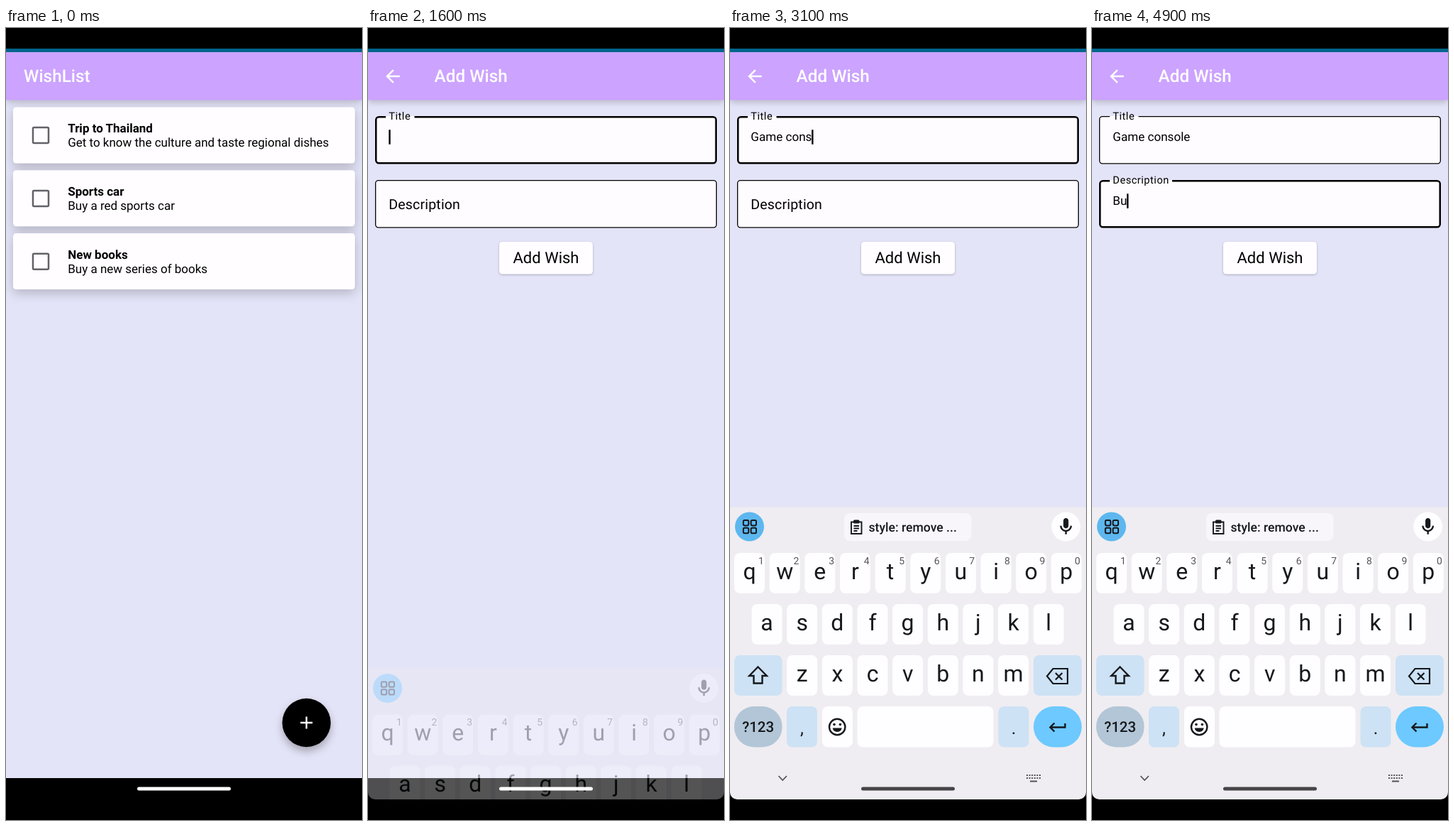
Recreate the animation shown at these times as an HTML page. Size 502 px wide and 1115 px high, loop 5 s.

```html
<!DOCTYPE html>
<html lang="en">
<head>
<meta charset="utf-8">
<title>WishList</title>
<style>
  html, body { margin: 0; height: 100%; overflow: hidden; background: #000; }
  svg { display: block; width: 502px; height: 1115px; }
  text { font-family: Roboto, sans-serif; white-space: pre; text-rendering: geometricPrecision; }
  .mid { text-anchor: middle; }
  .bar { filter: drop-shadow(0 3px 4px rgba(0, 0, 0, .2)); }
  .card { filter: drop-shadow(0 5px 8px rgba(0, 0, 0, .22)); }
  .fab { filter: drop-shadow(0 6px 6px rgba(0, 0, 0, .28)); }
  .button { filter: drop-shadow(0 1.5px 1.5px rgba(0, 0, 0, .25)); }
  .line { fill: none; stroke: #15181c; stroke-width: 2.4; }
</style>
</head>
<body>
<svg id="stage" viewBox="0 0 502 1115"></svg>
<script>
const LOOP = 5000, STEP = 100;
const INK = '#15181c', KEY = '#fefdff', SOFT = '#cde2f5', SKY = '#6dc9ff';

const rect = (x, y, w, h, fill, r = 0, extra = '') =>
  `<rect x="${x}" y="${y}" width="${w}" height="${h}" rx="${r}" fill="${fill}" ${extra}/>`;
const disc = (x, y, r, fill, extra = '') => `<circle cx="${x}" cy="${y}" r="${r}" fill="${fill}" ${extra}/>`;
const text = (x, y, size, str, extra = '') => `<text x="${x}" y="${y}" font-size="${size}" ${extra}>${str}</text>`;
const line = (d, extra = '') => `<path class="line" d="${d}" ${extra}/>`;
const icon = (x, y, scale, d, fill) =>
  `<path transform="translate(${x} ${y}) scale(${scale}) translate(-12 -12)" d="${d}" fill="${fill}"/>`;

const appBar = (x, title) =>
  rect(0, 34, 502, 1022, '#e4e4f8') +
  rect(0, 34, 502, 67.5, '#cca3ff', 0, 'class="bar"') +
  text(x, 76, 24.3, title, 'fill="#fff" font-weight="500"');

function listScreen() {
  const wishes = [
    ['Trip to Thailand', 'Get to know the culture and taste regional dishes'],
    ['Sports car', 'Buy a red sports car'],
    ['New books', 'Buy a new series of books'],
  ];
  const cards = wishes.map(([title, note], i) => {
    const y = 111.5 + i * 88.8;
    return rect(10, y, 482, 79, '#fffdff', 4.5, 'class="card"') +
      rect(38, y + 28.6, 22, 22, 'none', 1.5, 'stroke="#626268" stroke-width="2.5"') +
      text(87.2, y + 35.6, 17, title, 'font-weight="700"') +
      text(87.2, y + 55.4, 17, note);
  }).join('');
  return appBar(25, 'WishList') + cards +
    disc(423.7, 978, 34.2, '#000', 'class="fab"') +
    line('M415.2 978h17M423.7 969.5v17', 'style="stroke:#fff"');
}

const field = (id, label) => `<g id="${id}">
  <rect x="10" width="482" height="67.5" rx="5" fill="#fffcff"/>
  <path fill="none" stroke="#000"/><text class="label" x="29.3">${label}</text>
  <text class="value" x="29.3" font-size="17.08"></text>
  <rect class="caret" width="2.4" height="20.5"/></g>`;

const addScreen = () => appBar(93.5, 'Add Wish') +
  icon(35, 68, 1.22, 'M20 11H7.83l5.59-5.59L12 4l-8 8 8 8 1.41-1.41L7.83 13H20z', '#fff') +
  field('title', 'Title') + field('note', 'Description') +
  rect(185, 301, 132, 45.5, '#fffdff', 4.5, 'class="button"') +
  text(251, 331, 22, 'Add Wish', 'class="mid"');

function keyboard() {
  const key = (cx, y, label) => rect(cx - 21.5, y, 43, 57, KEY, 8) +
    text(cx, y + 37, 32, label, `class="mid" fill="${INK}"`);
  const row = (letters, x, y) => [...letters].map((c, i) => key(x + i * 49.65, y, c)).join('');
  const digits = [...'1234567890'].map((d, i) =>
    text(44 + i * 49.55, 755, 14, d, 'class="mid" fill="#55555b"')).join('');
  const tiles = [[18.8, 693], [29.6, 693], [18.8, 703.8], [29.6, 703.8]].map(([x, y]) =>
    rect(x, y, 7.4, 7.4, 'none', 1.8, `stroke="${INK}" stroke-width="2"`)).join('');
  const chip = `<g id="chip">` + rect(161, 683, 179.5, 39, '#f8f6fa', 8) +
    line('M171 695.5h14.5v16.5h-14.5zM174.5 701h7.5M174.5 704.5h7.5M174.5 708h5', 'style="stroke-width:1.9"') +
    rect(174, 692.5, 8.5, 5, INK, 1.5) +
    text(195.5, 708.5, 17.6, 'style: remove ...', `font-weight="500" fill="${INK}"`) + '</g>';

  return rect(0, 674.5, 502, 420, '#efedf1') +
    disc(27.5, 702, 20.5, SKY, 'id="menu"') + tiles + chip +
    disc(473.7, 702, 20.5, KEY) +
    icon(473.7, 702, 1.2, 'M12 14c1.66 0 3-1.34 3-3V5c0-1.66-1.34-3-3-3S9 3.34 9 5v6c0 1.66 1.34 3 3 3zm5-3' +
      'c0 2.76-2.24 5-5 5s-5-2.24-5-5H5c0 3.53 2.61 6.43 6 6.92V21h2v-3.08c3.39-.49 6-3.39 6-6.92z', INK) +
    row('qwertyuiop', 27.5, 739) + digits + row('asdfghjkl', 52, 811) + row('zxcvbnm', 101.7, 883) +
    rect(6, 883, 67.5, 57, SOFT, 8) + line('M39.5 899.5l12.3 12.5h-6.3v10.5h-12v-10.5h-6.3z') +
    rect(428, 883, 68, 57, SOFT, 8) +
    line('M455.5 902h20.5v21h-20.5l-8.5-10.5zM459 908l9.5 9.5M468.5 908l-9.5 9.5', 'style="stroke-width:2.2"') +
    rect(6, 955, 67.5, 57.5, '#b2c6d7', 28) + text(39.7, 990.5, 20.5, '?123', `class="mid" font-weight="500" fill="${INK}"`) +
    rect(80, 955, 43, 57.5, SOFT, 8) + text(101.5, 994, 25, ',', `class="mid" fill="${INK}"`) +
    rect(130, 955, 43, 57.5, KEY, 8) + line('M140 984a11.2 11.2 0 1 0 22.4 0a11.2 11.2 0 1 0 -22.4 0') +
    disc(147, 980.5, 1.8, INK) + disc(155.4, 980.5, 1.8, INK) +
    `<path d="M144.7 985.5h13a6.6 6.6 0 0 1-13 0z" fill="${INK}"/>` +
    rect(179.5, 955, 192, 57.5, KEY, 8) +
    rect(378.5, 955, 43, 57.5, SOFT, 8) + text(400, 994, 25, '.', `class="mid" fill="${INK}"`) +
    rect(428, 955, 68, 57.5, SKY, 28.7) + line('M472.5 979v5.5h-20M457.5 978.5l-6 6 6 6') +
    line('M68.5 1053l5.7 6 5.7-6', 'style="stroke:#55545a;stroke-width:1.8"') +
    line('M418 1052h20M418 1056h20', 'style="stroke:#55545a;stroke-width:2;stroke-dasharray:2 1.6"') +
    line('M423 1060.5h10', 'style="stroke:#55545a;stroke-width:1.8"');
}

const stage = document.getElementById('stage');
stage.innerHTML = `
  <clipPath id="window">${rect(0, 34, 502, 1052, '#000', 10)}</clipPath>
  ${rect(0, 34, 502, 1022, '#fff')}
  <g id="list">${listScreen()}</g>
  <g id="add">${addScreen()}</g>
  ${rect(0, 29, 502, 5, '#00658c')}
  <g clip-path="url(#window)"><g id="keys">${keyboard()}</g></g>
  ${rect(185, 1068.5, 132, 5, '#fff', 2.5, 'id="pill"')}`;

const find = id => document.getElementById(id);
const clamp = v => Math.min(1, Math.max(0, v));
const mix = (a, b, p) => a + (b - a) * p;
const span = (t, start, length) => clamp((t - start) / length);

// Standard material curve: cubic-bezier(.4, 0, .2, 1)
function ease(x) {
  let lo = 0, hi = 1;
  for (let i = 0; i < 24; i++) {
    const s = (lo + hi) / 2, r = 1 - s;
    if (1.2 * r * r * s + .6 * r * s * s + s ** 3 < x) lo = s; else hi = s;
  }
  return lo * lo * (3 - 2 * lo);
}

function drawField(id, y, raised, focus, value, caret, notch) {
  const group = find(id), [box, outline, label, input, bar] = group.children;
  const weight = mix(1.3, 2.5, focus), h = weight / 2;
  const l = 10 + h, r = 492 - h, top = y + h, bottom = y + 67.5 - h;
  const from = mix(45, 25, raised), to = mix(45, notch, raised);
  box.setAttribute('y', y);
  outline.setAttribute('stroke-width', weight);
  outline.setAttribute('d', `M${raised ? to : from} ${top}H${r - 4}a4 4 0 0 1 4 4V${bottom - 4}a4 4 0 0 1 -4 4` +
    `H${l + 4}a4 4 0 0 1 -4 -4V${top + 4}a4 4 0 0 1 4 -4H${from}`);
  label.setAttribute('y', y + mix(41, 4.8, raised));
  label.setAttribute('font-size', mix(19.53, 14.65, raised));
  label.setAttribute('letter-spacing', mix(.18, .49, raised));
  input.setAttribute('y', y + 35);
  input.textContent = value;
  bar.setAttribute('x', 29.3 + (value ? input.getComputedTextLength() - .3 : 0));
  bar.setAttribute('y', y + 19.3);
  bar.setAttribute('opacity', caret ? 1 : 0);
}

const typed = (str, times, t) => str.slice(0, times.filter(at => at <= t).length);
const TITLE_TIMES = [2100, 2400, 2500, 2600, 2800, 2800, 2900, 3000, 3100, 3200, 3300, 3400];

function draw(t) {
  const fade = t < 600 ? 0 : t > 1000 ? 1 : ease(span(t, 418, 700));
  find('list').setAttribute('opacity', 1 - fade);
  find('add').setAttribute('opacity', fade);

  const titleUp = ease(span(t, 1250, 150)), noteUp = ease(span(t, 4250, 150));
  const titleCaret = t >= 1400 && t < 4300 && !(t >= 3700 && t < 4000);
  drawField('title', 124, titleUp, titleUp - noteUp, typed('Game console', TITLE_TIMES, t), titleCaret, 65.5);
  drawField('note', 214, noteUp, noteUp, typed('Bu', [4700, 4900], t), t >= 4400, 113);

  const rise = span(t, 1506, 285);
  find('keys').setAttribute('opacity', rise);
  find('keys').setAttribute('transform', `translate(0 ${412 * (1 - ease(rise))})`);
  find('chip').setAttribute('opacity', span(t, 1800, 200));
  find('menu').setAttribute('fill', t < 2800 ? SKY : '#5db7ef');

  const shade = mix(255, 70, 1 - (1 - span(t, 1800, 800)) ** 1.4);
  find('pill').setAttribute('fill', `rgb(${shade} ${shade - 2} ${shade})`);
}

function tick() {
  draw(Math.floor(performance.now() % LOOP / STEP) * STEP);
  requestAnimationFrame(tick);
}
tick();
</script>
</body>
</html>
```
